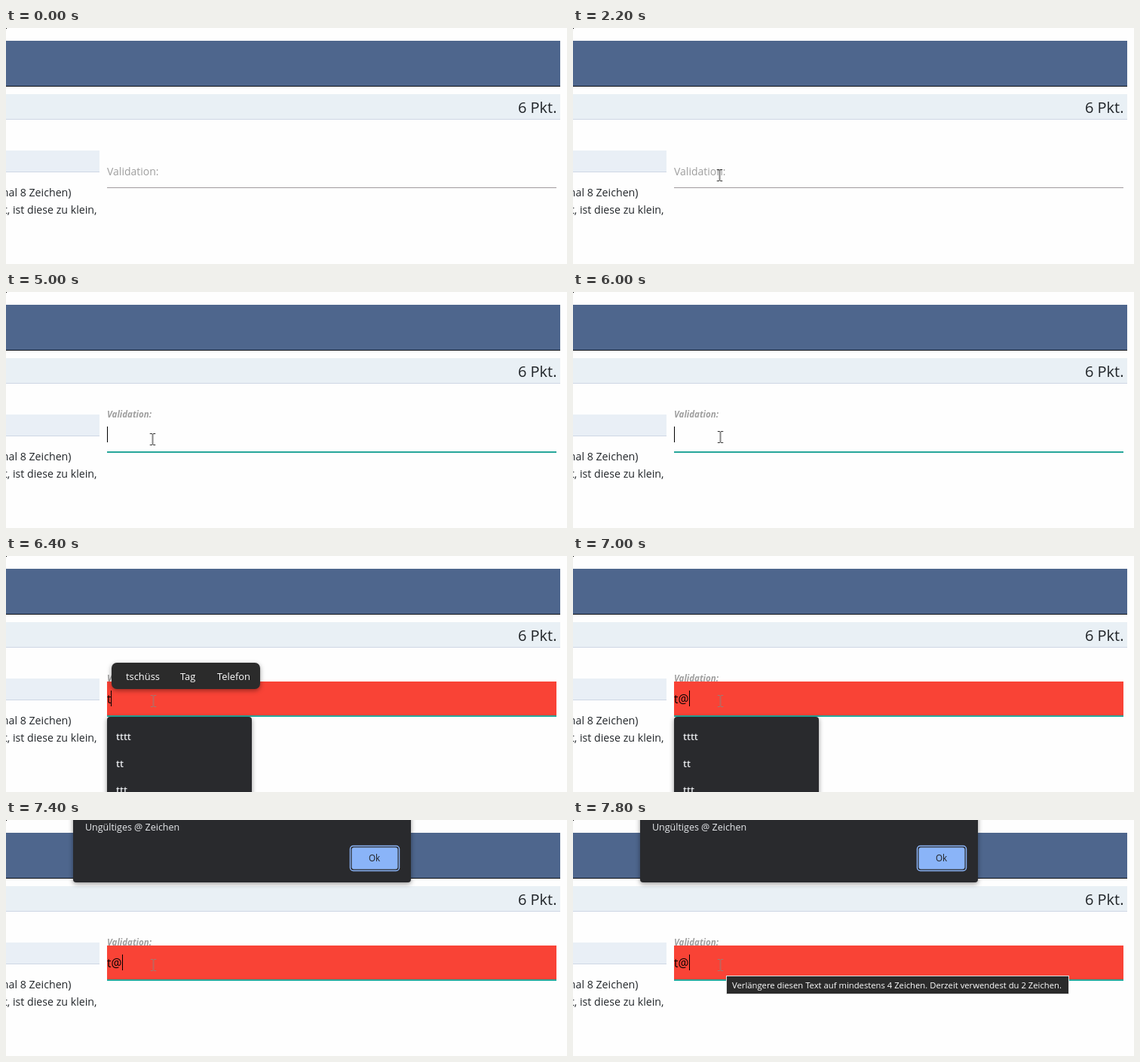
An HTML page for the animation above (8 s loop, 744x314 px).

```html
<!DOCTYPE html>
<html lang="de">
<head>
<meta charset="utf-8">
<title>Validation</title>
<style>
html, body { margin: 0; width: 744px; height: 314px; overflow: hidden; background: #fefefe; }
svg { display: block; font-family: "Open Sans", "Noto Sans", sans-serif; font-size: 14px; }

.anim { animation: 8s step-end infinite; }
.end { text-anchor: end; }
.mid { text-anchor: middle; }
.body { font-size: 14.2px; fill: #212529; }
.dark { fill: #292a2d; }
.light { fill: #e8eaed; }
.shadow { filter: drop-shadow(0 2px 3px rgba(0, 0, 0, .4)); }

.placeholder { fill: #9e9e9e; animation-name: placeholder; }
.label { fill: #9e9e9e; font: italic 700 11.5px "Open Sans", "Noto Sans", sans-serif;
  transform-origin: 134px 167px; animation-name: label; }
.line { fill: #a09a9d; animation-name: line; }
.caret { fill: #000; animation-name: caret; }
.error { animation-name: error; }
.at { animation-name: at; }
.words { font-size: 12.9px; animation-name: words; }
.list { font-size: 12.6px; font-weight: 600; transform-origin: 230px 320px; animation-name: list; }
.dialog { animation-name: dialog; }
.tip { animation-name: tip; }
.arrow { animation-name: arrow; }
.beam { fill: none; stroke: #111; animation-name: beam; }

@keyframes placeholder { 0% { opacity: 1 } 50%, 100% { opacity: 0 } }
@keyframes label {
  0% { opacity: 0; transform: none }
  50% { opacity: 1; transform: translateY(6px) scale(1.05) }
  52.5%, 100% { opacity: 1; transform: none }
}
@keyframes line {
  0% { fill: #a09a9d; height: 1px }
  50% { fill: #4fa598; height: 1.4px }
  52.5%, 100% { fill: #26a69a; height: 2px }
}
@keyframes caret {
  0% { opacity: 0; transform: none }
  50% { opacity: 1 }
  55% { opacity: 0 }
  62.5% { opacity: 1 }
  67.5% { opacity: 0 }
  75% { opacity: 1; transform: none }
  80% { opacity: 1; transform: translateX(5px) }
  85%, 100% { opacity: 1; transform: translateX(20px) }
}
@keyframes error { 0% { opacity: 0 } 80%, 100% { opacity: 1 } }
@keyframes at { 0% { opacity: 0 } 85%, 100% { opacity: 1 } }
@keyframes words { 0% { opacity: 0 } 80% { opacity: 1 } 85%, 100% { opacity: 0 } }
@keyframes list {
  0% { opacity: 0; transform: none }
  80% { opacity: 1; transform: none }
  90% { opacity: .08; transform: scale(.955) }
  92.5%, 100% { opacity: 0; transform: none }
}
@keyframes dialog {
  0% { opacity: 0; transform: none }
  90% { opacity: .5; transform: translateY(-13px) }
  92.5%, 100% { opacity: 1; transform: none }
}
@keyframes tip { 0% { opacity: 0 } 97.5%, 100% { opacity: 1 } }
@keyframes arrow { 0% { opacity: 0 } 15% { opacity: 1 } 17.5%, 100% { opacity: 0 } }
@keyframes beam {
  0% { opacity: 0; transform: none; stroke: #111 }
  17.5% { opacity: 1; transform: translate(188.5px, 201px) }
  20% { opacity: 1; transform: translate(194.5px, 196px) }
  67.5% { opacity: 1; transform: translate(195.5px, 193px); stroke: #111 }
  80%, 100% { opacity: 1; transform: translate(195.5px, 193px); stroke: #8c8580 }
}
</style>
</head>
<body>
<svg width="744" height="314" viewBox="0 0 744 314">
  <!-- page -->
  <rect width="1" height="1"/>
  <rect y="17" width="735" height="60" fill="#4e668d"/>
  <rect y="77" width="735" height="1" fill="#0b0d12"/>
  <rect y="88" width="735" height="33" fill="#e9f0f5"/>
  <rect y="121" width="735" height="1" fill="#ced6e4"/>
  <text class="end" x="730.5" y="112.5" font-size="20" fill="#212529">6 Pkt.</text>
  <rect y="163" width="124" height="28" fill="#e9eff6"/>
  <rect y="191" width="124" height="1" fill="#ced6e4"/>
  <text class="body end" x="86.5" y="224">maximal 8 Zeichen)</text>
  <text class="body end" x="120.5" y="247">gesetzt, ist diese zu klein,</text>

  <!-- input field -->
  <text class="anim placeholder" x="134" y="196">Validation:</text>
  <text class="anim label" x="134" y="167">Validation:</text>
  <g class="anim error">
    <rect x="134" y="167" width="596" height="46" fill="#f94336"/>
    <text x="134" y="196" font-size="15.5">t<tspan class="anim at"></tspan></text>
  </g>
  <text class="anim at" x="139.6" y="196" font-size="15.5">@</text>
  <rect class="anim line" x="134" y="212" width="596" height="1"/>
  <rect class="anim caret" x="134" y="179" width="1" height="21"/>

  <!-- pointer -->
  <path class="anim arrow" d="M138 257v16l4-4 3 6 2-1-3-6h5z" fill="#fff" stroke="#000"/>
  <path class="anim beam" d="M-3.5-7.5h2.5l1 1 1-1h2.5M0-6.5v13M-3.5 7.5h2.5l1-1 1 1h2.5"/>

  <!-- suggestions -->
  <g class="anim list">
    <rect class="dark shadow" x="134" y="214" width="192" height="120" rx="4"/>
    <g class="light">
      <text x="146" y="245">tttt</text>
      <text x="146" y="281">tt</text>
      <text x="146" y="316">ttt</text>
    </g>
  </g>
  <g class="anim words">
    <rect class="shadow" x="140" y="142" width="197" height="35" rx="7" fill="#2b2b2b"/>
    <g fill="#fff">
      <text x="159" y="165">tschüss</text>
      <text x="231" y="165">Tag</text>
      <text x="280" y="165">Telefon</text>
    </g>
  </g>

  <!-- alert -->
  <g class="anim dialog">
    <rect class="dark shadow" x="89" y="-40" width="448" height="123" rx="4"/>
    <text class="light" x="105" y="14" font-size="12.5">Ungültiges @ Zeichen</text>
    <rect x="456.5" y="34.5" width="65" height="33" rx="4" fill="none" stroke="#8ab4f8" stroke-width="1.5"/>
    <rect x="458.5" y="36.5" width="61" height="29" rx="3" fill="#8ab4f8"/>
    <text class="mid" x="488.5" y="55" font-size="11.7" fill="#202124">Ok</text>
  </g>
  <g class="anim tip">
    <rect x="203.5" y="207.5" width="454" height="24" fill="#2b2b2b" stroke="#e4e4e4"/>
    <text x="211" y="224" font-size="11.28" fill="#fff">Verlängere diesen Text auf mindestens 4 Zeichen. Derzeit verwendest du 2 Zeichen.</text>
  </g>
</svg>
</body>
</html>
```
